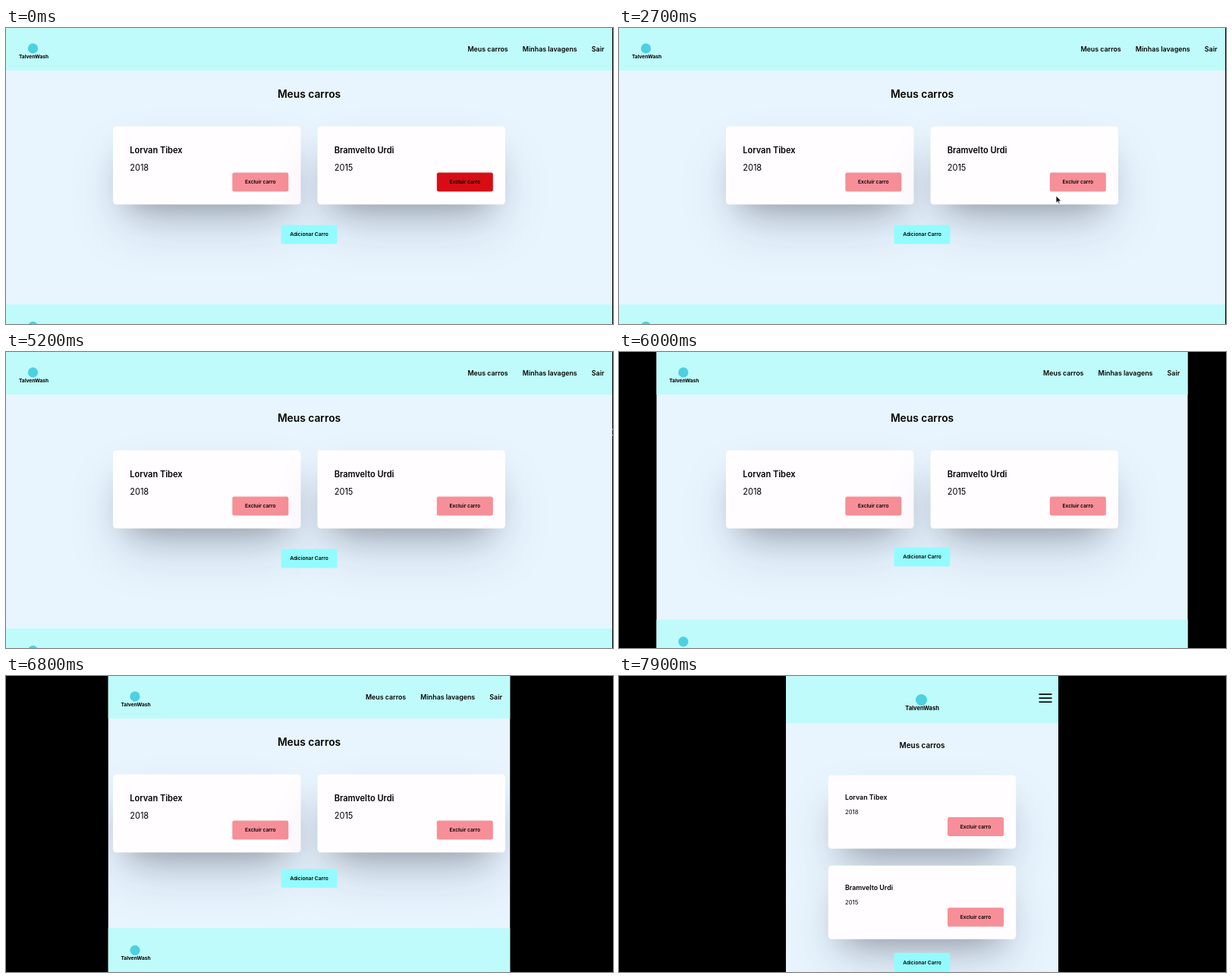
Write an HTML page with a canvas that moves like this. It is 800 px wide and 390 px high and loops after 8 s.

```html
<!DOCTYPE html>
<html lang="pt">
<head>
<meta charset="utf-8">
<title>Meus carros</title>
<style>
  html, body { margin: 0; height: 100%; overflow: hidden; background: #000; }
  canvas { display: block; }
</style>
</head>
<body>
<canvas width="800" height="390"></canvas>
<script>
const ctx = document.querySelector('canvas').getContext('2d');
const LOOP = 8000, STEP = 100;
const BAR = '#bffbfb', PAGE = '#e8f5fe', CARD = '#fffdff', LOGO = '#4cd0e2';
const PINK = [247, 143, 152], RED = [216, 12, 20];
const AQUA = [147, 251, 253], AQUA_HOVER = [85, 238, 244];
const CARS = [['Lorvan Tibex', '2018'], ['Bramvelto Urdi', '2015']];
const NAV = ['Sair', 'Minhas lavagens', 'Meus carros'];

// [time, left page edge]
const EDGE = [[5700, 25], [5800, 25], [6500, 110], [6700, 121], [7200, 188.5], [7600, 205], [7900, 220]];
// [time, x, y] of the pointer tip
const POINTER = [[700, 608, 203], [800, 612, 198], [1400, 717.5, 24.5], [1700, 717.5, 24.5],
  [2000, 780, 27], [2400, 576, 221], [2700, 576, 221], [2900, 588, 203], [3400, 332, 198.5],
  [3600, 332, 198.5], [4300, 400, 270], [4500, 400, 270], [5200, 798.5, 101]];
// [start, end] of each hover
const HOVERS = {
  car0: [[3330, 3750]],
  car1: [[-500, 850], [2850, 3000]],
  'Minhas lavagens': [[1200, 1800]],
  Sair: [[1900, 2150]],
  add: [[4100, 4600]],
};

const HAND = new Path2D('M0 1a1 1 0 0 1 2 0v3l4 1q1.4 .4 1.1 2.4l-.8 3H1L-2.6 6q.5-1.2 1.7-.4L0 6.4z');
const ARROW = new Path2D('M0 0v9.5l2.3-2 1.4 3.2 1.5-.7-1.4-3h3z');

const clamp = v => Math.max(0, Math.min(1, v));
const lerp = (a, b, k) => a + (b - a) * k;
const mix = (a, b, k) => `rgb(${a.map((v, i) => lerp(v, b[i], k))})`;

function along(keys, t) {
  const i = keys.findIndex(k => k[0] > t);
  if (i < 0) return keys.at(-1).slice(1);
  if (!i) return keys[0].slice(1);
  const a = keys[i - 1], b = keys[i], k = (t - a[0]) / (b[0] - a[0]);
  return a.slice(1).map((v, j) => lerp(v, b[j + 1], k));
}

const hover = (name, t) => (HOVERS[name] || []).reduce((sum, [on, off]) =>
  sum + clamp((t - on) / 300) * (1 - clamp((t - off) / 300)), 0);

function text(str, x, y, size, align = 'left', weight = 600) {
  ctx.font = `${weight} ${size}px Inter, sans-serif`;
  ctx.textAlign = align;
  ctx.fillStyle = '#000';
  ctx.fillText(str, x, y);
}

function box(x, y, w, h, color, radius = 0) {
  ctx.fillStyle = color;
  ctx.beginPath();
  ctx.roundRect(x, y, w, h, radius);
  ctx.fill();
}

function shadow(x, y, w, h, color, dy, blur, inset) {
  ctx.save();
  ctx.shadowColor = color;
  ctx.shadowOffsetY = dy;
  ctx.shadowBlur = blur;
  box(x + inset, y + inset, w - 2 * inset, h - 2 * inset, CARD, 2);
  ctx.restore();
}

function button(label, x, y, color) {
  box(x, y, 74, 25, color, 2.5);
  text(label, x + 37, y + 14.9, 6.7, 'center');
}

function logo(x, y, size) {
  ctx.fillStyle = LOGO;
  ctx.beginPath();
  ctx.arc(x - 1, y - 13, size, 0, 7);
  ctx.fill();
  text('TalvenWash', x, y, size, 'center', 700);
}

function card(i, x, y, h, small, t) {
  const [name, year] = CARS[i];
  shadow(x, y, 247.5, h, 'rgba(50,50,93,.25)', 34.5, 69, 13.8);
  shadow(x, y, 247.5, h, 'rgba(0,0,0,.3)', 20.7, 41.4, 20.7);
  box(x, y, 247.5, h, CARD, 4.5);
  text(name, x + 22.2, y + (small ? 32.7 : 35.6), small ? 8.83 : 11.04);
  text(year, x + 22.2, y + (small ? 51.3 : 58), small ? 7.73 : 11.04, 'left', 400);
  button('Excluir carro', x + 157.3, y + (small ? 55.5 : 61), mix(PINK, RED, hover('car' + i, t)));
}

function nav(right, t) {
  let x = right - 10.5;
  for (const item of NAV) {
    const h = hover(item, t), size = 8.83 * (1 + .02 * h);
    ctx.font = `600 ${size}px Inter, sans-serif`;
    const w = ctx.measureText(item).width;
    box(x - w - 9, 14, w + 19.5, 28, `rgba(165,250,255,${.6 * h})`, 2.5);
    text(item, x, 31.2, size, 'right');
    x -= w + 19.2;
  }
}

function menuIcon(right) {
  for (const y of [23.2, 28.3, 33.4]) box(right - 25.5, y, 17, 1.7, '#000');
}

function pointer(t) {
  if (t < 800 || t >= 5700) return;
  const hand = Object.values(HOVERS).flat().some(([on, off]) => t >= on && t < off);
  const shape = hand ? HAND : ARROW;
  ctx.save();
  ctx.translate(...along(POINTER, t));
  ctx.lineWidth = .8;
  ctx.strokeStyle = hand ? '#222' : '#fff';
  ctx.fillStyle = hand ? '#fff' : '#111';
  ctx.fill(shape);
  ctx.stroke(shape);
  ctx.restore();
}

function draw(t) {
  const left = t < 5700 ? 0 : along(EDGE, t)[0];
  const right = 799 - left, width = right - left, mid = 399.5;
  const small = width < 530;
  const cardHeight = small ? 97 : 103;
  const cardsBottom = small ? 346.7 : 232.5;
  const addTop = cardsBottom + 10.65 + .0205 * width;
  const footerTop = addTop + 26.3 + .098 * width;

  box(0, 0, 800, 390, '#000');
  ctx.save();
  ctx.beginPath();
  ctx.rect(left, 0, width, 390);
  ctx.clip();
  box(left, 0, width, 390, PAGE);

  if (small) {
    card(0, mid - 123.75, 130.5, cardHeight, true, t);
    card(1, mid - 123.75, 249.7, cardHeight, true, t);
  } else {
    card(0, mid - 258.5, 129.5, cardHeight, false, t);
    card(1, mid + 11, 129.5, cardHeight, false, t);
  }
  text('Meus carros', mid, small ? 94.5 : 92.4, small ? 9.94 : 13.8, 'center');
  button('Adicionar Carro', mid - 37, addTop, mix(AQUA, AQUA_HOVER, hover('add', t)));

  box(left, 0, width, small ? 62 : 56, BAR);
  if (small) {
    logo(mid, 44.5, 7.5);
    menuIcon(right);
  } else {
    logo(left + 36.5, 39.9, 6.6);
    nav(right, t);
    box(left, footerTop, width, 390, BAR);
    logo(left + 36.5, footerTop + 42.2, 6.6);
  }
  ctx.restore();
  pointer(t);
}

function tick() {
  const t = performance.now() % LOOP;
  draw(Math.floor(t / STEP) * STEP);
  requestAnimationFrame(tick);
}
tick();
</script>
</body>
</html>
```
